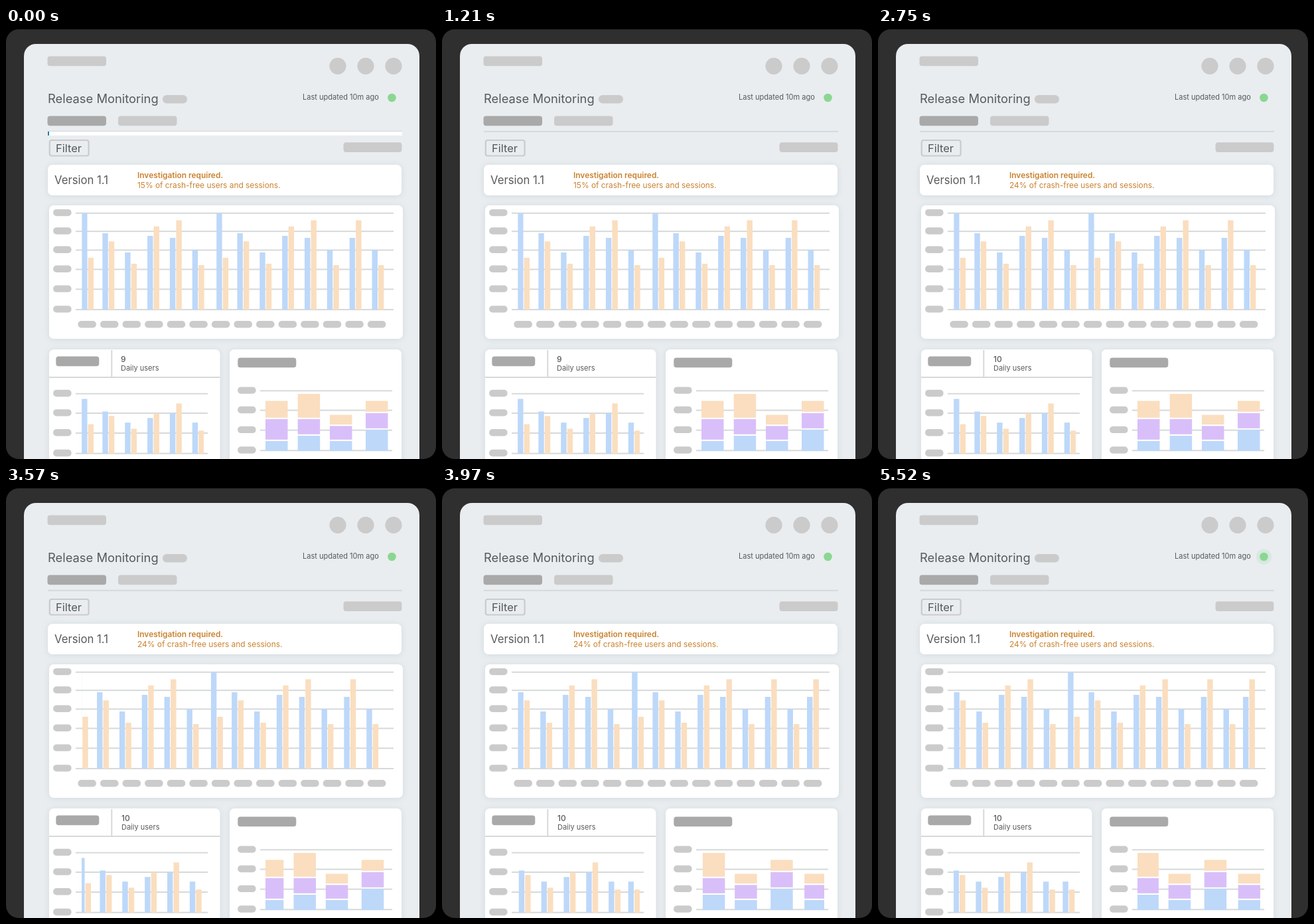
Recreate the animation shown at these times as an HTML page. Size 648 by 649 pixels, loop 5.6 s.

```html
<!DOCTYPE html>
<html lang="en">
<head>
<meta charset="utf-8">
<title>Release monitoring dashboard</title>
<style>
html, body { margin: 0; width: 100%; height: 100%; overflow: hidden; background: #000; }
svg { display: block; width: 648px; height: 649px; }
text { font-family: Inter, "Open Sans", sans-serif; fill: #57595b; }
.card { fill: #fff; filter: drop-shadow(0 1px 5px rgba(120, 140, 150, .2)); }
.warn text { fill: #c9822f; font-size: 11.9px; }
</style>
</head>
<body>
<svg viewBox="0 0 648 649">
  <defs>
    <clipPath id="clipMain"><rect x="114.3" y="270" width="456" height="160"/></clipPath>
    <clipPath id="clipDaily"><rect x="114" y="540" width="184" height="109"/></clipPath>
    <clipPath id="clipStack"><rect x="391" y="540" width="185" height="109"/></clipPath>
  </defs>
  <rect x="0" y="2" width="648" height="647" rx="19" fill="#2f2f2f"/>
  <path d="M27 649V42a18 18 0 0 1 18-18H605a18 18 0 0 1 18 18V649Z" fill="#e9edf0"/>
  <rect class="card" x="63" y="206" width="533" height="46" rx="7"/>
  <rect class="card" x="65" y="267" width="533" height="201" rx="7"/>
  <rect class="card" x="65" y="484" width="257.5" height="190" rx="7"/>
  <rect class="card" x="337" y="484" width="259" height="190" rx="7"/>
  <path d="M63 155.7H597M65 526H322.5M159.3 485V526" stroke="#d6d9da" stroke-width="2"/>
  <g id="grid"></g>
  <g id="pills"></g>
  <path d="M500 57.3h0M542 57.3h0M584 57.3h0" stroke="#cbcbcb" stroke-width="25.2" stroke-linecap="round"/>
  <rect x="65.8" y="169" width="58.8" height="23.5" rx="3" fill="none" stroke="#cbcbcb" stroke-width="2.2"/>
  <text x="63" y="113" font-size="18.35">Release Monitoring</text>
  <text x="75" y="186.5" font-size="16.5">Filter</text>
  <text x="73" y="235" font-size="16.7">Version 1.1</text>
  <text x="447" y="108" font-size="11.05">Last updated 10m ago</text>
  <g class="warn">
    <text x="198" y="226" font-weight="600">Investigation required.</text>
    <text class="before" x="198" y="241">15% of crash-free users and sessions.</text>
    <text class="after" x="198" y="241">24% of crash-free users and sessions.</text>
  </g>
  <text class="before" x="173" y="503" font-size="12" font-weight="500">9</text>
  <text class="after" x="174" y="503" font-size="12" font-weight="500">10</text>
  <text id="daily" x="173" y="516.3" font-size="11">Daily users</text>
  <circle id="ring" cx="581.5" cy="105" r="6" fill="#8bd792"/>
  <circle cx="581.5" cy="105" r="6.3" fill="#8bd792"/>
  <g id="loader">
    <rect x="63" y="156" width="534" height="5.8" fill="#fff"/>
    <rect id="fill" x="63" y="156" width="2" height="5.8" fill="#1c7fac"/>
  </g>
  <g id="main" clip-path="url(#clipMain)"></g>
  <g id="dailyBars" clip-path="url(#clipDaily)"></g>
  <g id="stacks" clip-path="url(#clipStack)"></g>
</svg>
<script>
const LOOP = 5600;
const BLUE = "#bdd8f9", PEACH = "#fadebf", LILAC = "#d9bff9";
const GRAY = "#cbcbcb", DARK = "#a9a9a9", LINE = "#d6d9da";
const $ = id => document.getElementById(id);

function add(parent, x, y, width, height, fill, rx = 0) {
  const el = document.createElementNS("http://www.w3.org/2000/svg", "rect");
  const attrs = { x, y, width, height, fill, rx };
  for (const key in attrs) el.setAttribute(key, attrs[key]);
  $(parent).append(el);
  return el;
}

const clamp = v => Math.max(0, Math.min(1, v));
const lerp = (a, b, p) => a + (b - a) * p;

// Bezier (.42,0,.58,1), solved for its parameter by bisection
function ease(v) {
  let lo = 0, hi = 1;
  for (let i = 0; i < 22; i++) {
    const s = (lo + hi) / 2, r = 1 - s;
    if (1.26 * r * r * s + 1.74 * r * s * s + s * s * s < v) lo = s; else hi = s;
  }
  return lo * lo * (3 - 2 * lo);
}
const tween = (t, start, length) => ease(clamp((t - start) / length));

const pill = (x, y, w, fill = GRAY) => add("pills", x, y, w, 14.7, fill, 4);
const smallPill = (x, y) => add("pills", x, y, 27.5, 10.4, GRAY, 5);

// Rows spread slightly towards the bottom
function axis(x, top, width, rows, step, bend) {
  for (let i = 0; i < rows; i++) {
    const y = top + step * i + bend * i * i;
    add("grid", x, y - 1, width, 2, LINE);
    smallPill(x - 33.9, y - 5.9);
  }
}

function buildPanels() {
  axis(105, 278.8, 479, 6, 27, .41);
  axis(105, 550.7, 199, 4, 29, .33);
  axis(383, 546.3, 199, 4, 29, .33);
  for (let i = 0; i < 14; i++) smallPill(108.4 + 33.58 * i, 441);

  add("pills", 236, 101, 37, 12.5, GRAY, 6);
  pill(62.5, 42.5, 88.5);
  pill(62.5, 132.5, 88.5, DARK);
  pill(169, 132.5, 88.5);
  pill(508.5, 172.3, 88);
  pill(75.3, 494.5, 65, DARK);
  pill(349.3, 496.5, 88, DARK);
}

// Blue heights in the two bar charts; peach is a share of blue
const KINDS = [
  { main: 145, daily: 82.5, share: .538 },
  { main: 115, daily: 63.5, share: .893 },
  { main: 86, daily: 46.8, share: .802 },
  { main: 111, daily: 53.8, share: 1.128 },
  { main: 108, daily: 60.8, share: 1.245 },
  { main: 90, daily: 46.8, share: .744 }
];

// The last group of each order enters from the right
function buildBars(id, chart, order, base, shift) {
  return [...order].flatMap((kind, i) => {
    const { [chart]: blue, share } = KINDS[kind];
    const entering = i === order.length - 1;
    const x = 111.5 + 33.85 * i + (kind === "0" ? 2.6 : 0) - (entering ? 4.4 : 0);
    return [[x, blue, BLUE], [x + 9.5, blue * share, PEACH]].map(([from, h, fill]) =>
      ({ el: add(id, from, base - h, 8.4, h, fill), from, to: from - shift }));
  });
}

// Each column: x, then the tops of peach, lilac and blue
function buildStacks() {
  const columns = [
    [391, 561.5, 589, 622], [439.7, 551, 589, 614], [488, 582.5, 599.3, 622],
    [542, 561.5, 580, 605], [593, 582.5, 599.3, 622]
  ];
  return columns.flatMap(([from, ...tops]) => [PEACH, LILAC, BLUE].map((fill, i) => {
    const end = i < 2 ? tops[i + 1] - 2.2 : 637;
    return { el: add("stacks", from, tops[i], 33.5, end - tops[i], fill), from, to: from - 50.3 };
  }));
}

buildPanels();
const mainBars = buildBars("main", "main", "012345012345454", 424, 31);
const lowerBars = [...buildBars("dailyBars", "daily", "0123455", 641, 31.8), ...buildStacks()];
const before = document.querySelectorAll(".before");
const after = document.querySelectorAll(".after");

const place = (parts, p) => parts.forEach(m => m.el.setAttribute("x", lerp(m.from, m.to, p)));
const fade = (parts, v) => parts.forEach(el => el.setAttribute("opacity", v));

function drawRing(t) {
  const first = t < 410 ? 0 : tween(t, 330, 600);
  const last = tween(t, 5040, 480);
  $("ring").setAttribute("r", 6 + 5.6 * (t < 2000 ? first : last));
  $("ring").setAttribute("opacity", .2 * Math.sin(Math.PI * first) + .17 * last);
}

function draw(t) {
  const load = t < 410 ? 0 : tween(t, 320, 700);
  $("fill").setAttribute("width", lerp(2, 534, load));
  $("loader").setAttribute("opacity", 1 - clamp((t - 990) / 200));

  const swap = tween(t, 1870, 700);
  fade(before, 1 - swap);
  fade(after, swap);
  $("daily").setAttribute("x", 173 + swap);

  place(mainBars, tween(t, 3442, 360));
  place(lowerBars, tween(t, 3400, 700));
  drawRing(t);
}

const start = performance.now();
function tick() {
  draw((performance.now() - start) % LOOP);
  requestAnimationFrame(tick);
}
draw(0);
requestAnimationFrame(tick);
</script>
</body>
</html>
```
